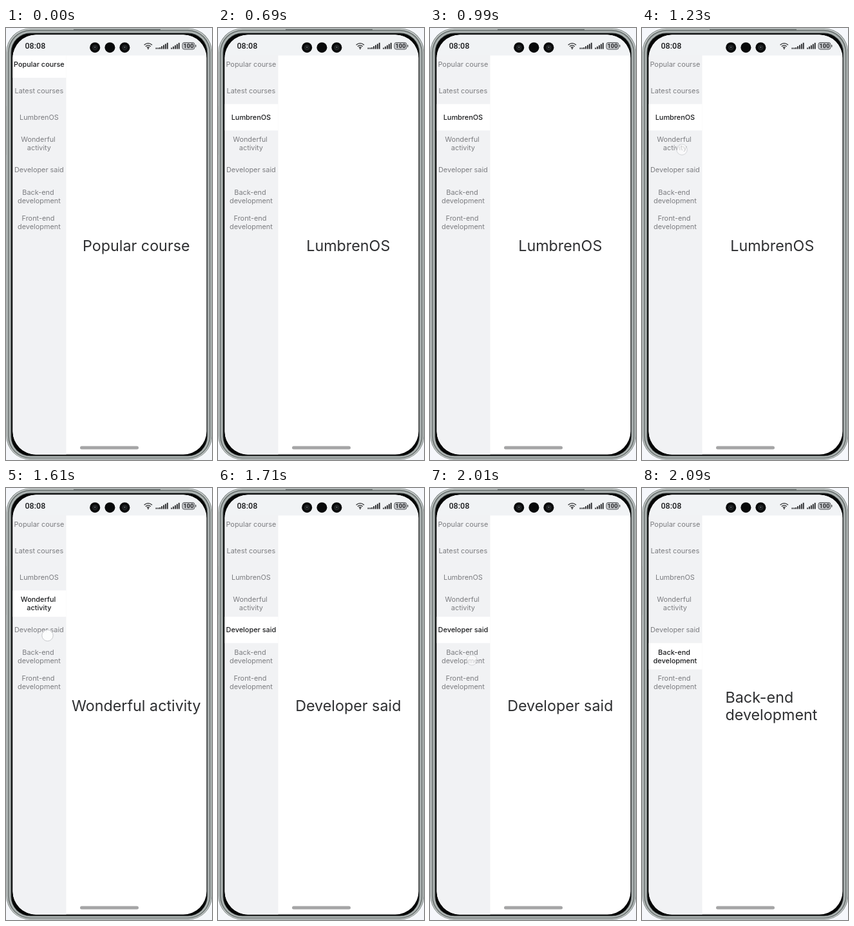
An HTML page for the animation above (3.1 s loop, 320 px wide and 668 px high).

```html
<!DOCTYPE html>
<html lang="en">
<head>
<meta charset="utf-8">
<title>Side tabs</title>
<style>
html, body { margin: 0; width: 100%; height: 100%; overflow: hidden; background: #f5f7fb; }
svg { display: block; width: 100%; height: 100%; }
text { font-family: Inter, sans-serif; font-optical-sizing: none; }
.tab { font-size: 10.9px; fill: #7c7d80; text-anchor: middle; }
.tab.on { fill: #1c1d1f; font-weight: 450; }
.title { font-size: 23.3px; fill: #2e2f31; }
.clock { font: 500 12.5px Roboto, sans-serif; fill: #1b1c1e; }
.level { font: 600 9.3px Roboto, sans-serif; fill: #222326; text-anchor: middle; }
</style>
</head>
<body>
<svg id="stage" viewBox="0 0 320 668">
  <defs>
    <clipPath id="screen"><rect x="10.5" y="10.5" width="301" height="649" rx="36"/></clipPath>
  </defs>

  <!-- phone body -->
  <g id="body"></g>
  <rect x="105" y="1.800" width="135" height="2" fill="#626968"/>
  <path d="M.5 121v75" stroke="#a9afae"/>

  <g clip-path="url(#screen)">
    <rect width="320" height="668" fill="#fff"/>
    <rect y="42" width="93.500" height="626" fill="#f1f2f4"/>
    <rect id="highlight" width="93.500" height="40.700" fill="#fff"/>
    <rect width="320" height="42.500" fill="#f1f3f5"/>
    <g id="tabs"></g>
    <g id="titles"></g>
    <rect x="115" y="646.500" width="91" height="5" rx="2.500" fill="#a5a5a6"/>
  </g>

  <!-- status bar -->
  <text class="clock" x="29.500" y="32">08:08</text>
  <g id="cameras"></g>
  <path d="M214.600 26.200q6.200-5.200 12.400 0M216.800 28.500q4-3.400 8 0M218.900 30.500q1.900-1.500 3.800 0" fill="none" stroke="#2a2b2d" stroke-width="1.300"/>
  <circle cx="220.800" cy="32" r="1" fill="#2a2b2d"/>
  <g id="signals" fill="#2a2b2d"></g>
  <rect x="274" y="22.500" width="19" height="10.500" rx="3" fill="#c9cbce" stroke="#55575a"/>
  <path d="M294.800 26v3.600" stroke="#55575a" stroke-width="1.300"/>
  <text class="level" x="283.500" y="31.200">100</text>

  <circle id="touch" fill="#fff" stroke="#bfc1c5"/>
</svg>
<script>
const LOOP = 3100, PITCH = 40.7, TOP = 36.3;
const $ = id => document.getElementById(id);

const TABS = [
  ['Popular course'], ['Latest courses'], ['LumbrenOS'], ['Wonderful', 'activity'],
  ['Developer said'], ['Back-end', 'development'], ['Front-end', 'development']
];

// start time, selected tab, optional touch [x, y, radius, opacity]
const STEPS = [
  [0, 0],
  [690, 2],
  [1230, 2, [62, 188, 8.3, 0.6]],
  [1290, 3],
  [1610, 3, [64.5, 228, 8.7, 0.85]],
  [1710, 4],
  [2010, 4, [65, 266, 8, 0.6]],
  [2090, 5]
];

function add(parent, tag, attrs, text = '') {
  const node = document.createElementNS('http://www.w3.org/2000/svg', tag);
  for (const key in attrs) node.setAttribute(key, attrs[key]);
  node.textContent = text;
  return parent.appendChild(node);
}

// nested shells: inset, colour, corner radius
const SHELLS = [
  [0.4, '#868d8c', 37], [1.6, '#d3d8d7', 36], [2.8, '#666d6c', 35], [4.2, '#9fa6a5', 34],
  [6, '#c3c9c8', 32], [7.2, '#4c5251', 31], [8.5, '#050606', 29]
];
SHELLS.forEach(([inset, fill, rx]) => add($('body'), 'rect', {
  x: inset, y: inset, width: 320.6 - 2 * inset, height: 668 - 1.8 * inset, rx, fill
}));

[138.2, 161.4, 184.4].forEach((cx, i) => {
  add($('cameras'), 'circle', { cx, cy: 30.2, r: 8, fill: '#08090a' });
  if (i === 1) return;
  add($('cameras'), 'circle', { cx, cy: 30.2, r: 3.6, fill: '#17191b', stroke: '#35393c', 'stroke-width': 0.8 });
  add($('cameras'), 'circle', { cx, cy: 29.8, r: 1, fill: '#6d7376' });
});

function bars(x, count, height) {
  for (let i = 0; i < count; i++) {
    const h = height(i);
    add($('signals'), 'rect', { x: x + i * 2.9, y: 32.5 - h, width: 1.9, height: h });
  }
}
bars(232.5, 2, () => 2);
bars(238.2, 5, i => 2.5 + i * 1.8);
bars(256.2, 5, i => 2 + i * 1.9);

const tabs = TABS.map((lines, i) => {
  const group = add($('tabs'), 'g', {});
  const middle = TOP + PITCH * (i + 0.5);
  const wrapped = lines.length > 1;
  lines.forEach((line, n) => add(group, 'text', {
    x: wrapped && !n ? 50 : 51.4,
    y: middle + (wrapped ? -2.4 + n * 12.9 : 3.8)
  }, line));
  return group;
});

const titles = TABS.map((lines, i) => {
  const group = add($('titles'), 'g', { class: 'title' });
  if (i < 5) add(group, 'text', { x: 202.3, y: 345.2, 'text-anchor': 'middle' }, lines.join(' '));
  else lines.forEach((line, n) => add(group, 'text', { x: 129.5, y: 332 + n * 27.3 }, line));
  return group;
});

function draw(now) {
  const time = now % LOOP;
  const [, selected, touch] = STEPS.findLast(step => step[0] <= time);
  tabs.forEach((tab, i) => tab.setAttribute('class', i === selected ? 'tab on' : 'tab'));
  titles.forEach((title, i) => title.style.display = i === selected ? '' : 'none');
  $('highlight').setAttribute('y', TOP + PITCH * selected);
  $('touch').style.display = touch ? '' : 'none';
  if (touch) ['cx', 'cy', 'r', 'opacity'].forEach((key, i) => $('touch').setAttribute(key, touch[i]));
}

const start = performance.now();
function tick() {
  draw(performance.now() - start);
  requestAnimationFrame(tick);
}
tick();
</script>
</body>
</html>
```
